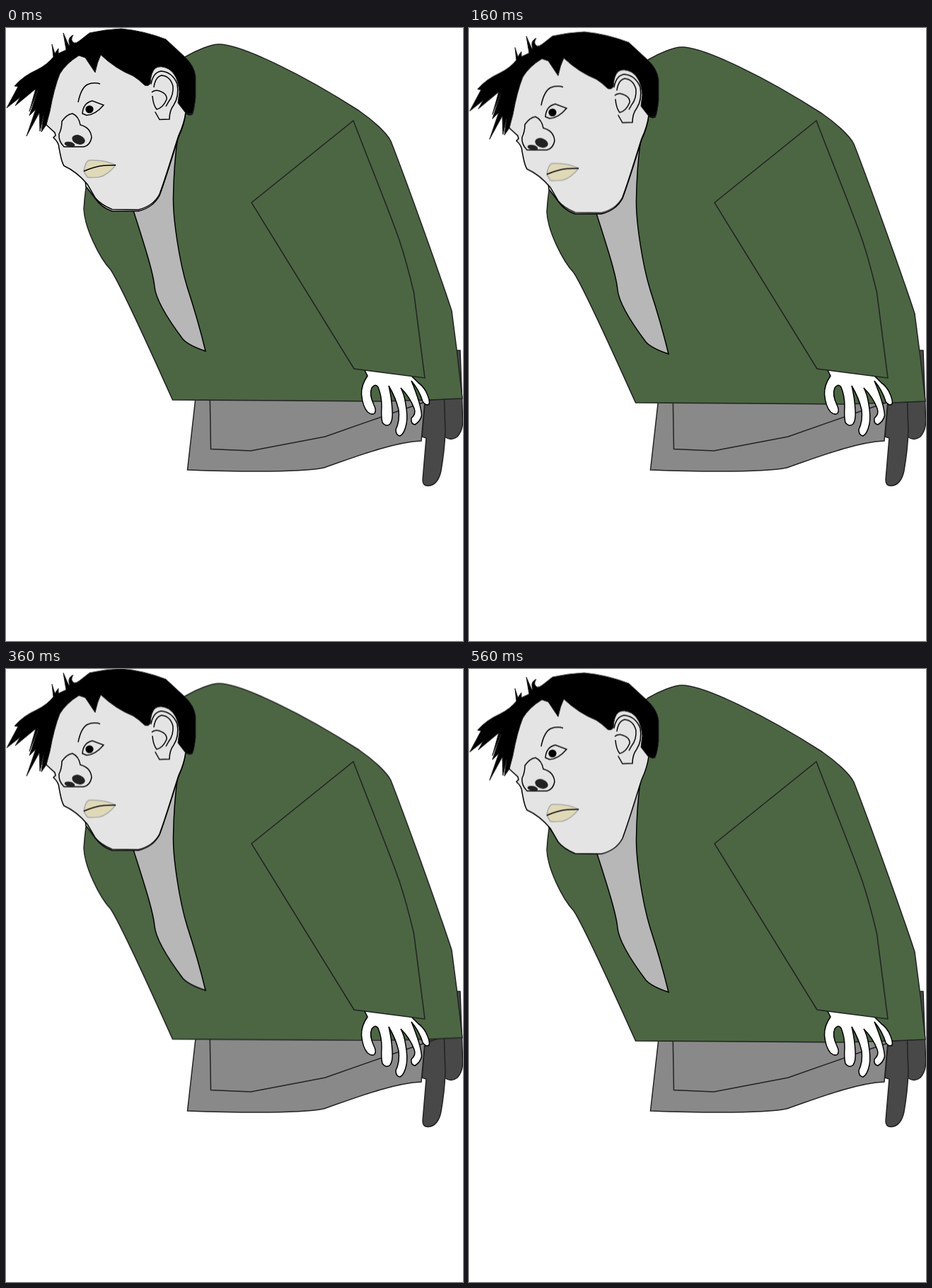
Write an HTML page that moves like this. It is 646x867 px and loops after 0.6 s.

```html
<!DOCTYPE html>
<html lang="en">
<head>
<meta charset="utf-8">
<title>Stooped man breathing</title>
<style>
html, body { margin: 0; width: 100%; height: 100%; overflow: hidden; background: #fff; }
svg { display: block; width: 646px; height: 867px; }
path { stroke: #222; stroke-width: 1.5; }
.line { fill: none; }
.cloth { fill: #4c6643; }
.pants { fill: #898989; }
.dark { fill: #484848; }
.ink path, path.ink { stroke: #000; }
.skin { fill: #e4e4e4; }
.body { animation: body 600ms infinite; }
.head { animation: head 600ms infinite; }

/* One step is 40 ms, a fifteenth of the loop. */
@keyframes body {
  0% { transform: translateY(0); animation-timing-function: steps(3); }
  20% { transform: translateY(6px); animation-timing-function: steps(2); }
  33.3333% { transform: translateY(2px); animation-timing-function: steps(2); }
  46.6667% { transform: translateY(-1px); animation-timing-function: steps(2); }
  60% { transform: translateY(-2.5px); animation-timing-function: steps(2); }
  73.3333% { transform: translateY(-1px); animation-timing-function: steps(3); }
  93.3333%, 100% { transform: translateY(0); animation-timing-function: steps(1); }
}
@keyframes head {
  0% { transform: translateY(0); animation-timing-function: steps(3); }
  20% { transform: translateY(4.5px); animation-timing-function: steps(2); }
  33.3333% { transform: translateY(4.5px); animation-timing-function: steps(2); }
  46.6667% { transform: translateY(0); animation-timing-function: steps(2); }
  60% { transform: translateY(-1.5px); animation-timing-function: steps(2); }
  73.3333% { transform: translateY(-1.5px); animation-timing-function: steps(3); }
  93.3333%, 100% { transform: translateY(4.5px); animation-timing-function: steps(1); }
}
</style>
</head>
<body>
<svg viewBox="0 0 646 867">
  <g id="legs">
    <path class="dark" d="M630 456H642L645.5 550Q647 568 638 578Q629 585 620 578L616 520Z"/>
    <path class="dark" d="M594 510L588 578L594 580L589 639Q589 648 597 647.5Q611 646 615 626Q620 597 621 570L619 510Z"/>
    <path class="pants" d="M270 505L256.5 625Q310 627 355 627Q425 627 449 622C490 608 545 586 587 584L594 505Z"/>
    <path class="line" d="M288 505L289.5 595.5L346 598L451 578L548 544L610 523"/>
  </g>

  <g class="body">
    <path class="cloth" d="M235 55L253 41C270 31 290 23 301 23C332 23 420 66 499 117C518 130 538 148 544 160C568 222 613 348 630 400L637.5 458L645 524L600 526L530 528L235.5 526C205 458 160 360 148 342C132 325 111 282 110 256Q111 240 113 226L120 200Z"/>
    <path class="ink" fill="#b7b7b7" d="M176 245L180 258C195 305 208 345 210 366C212 387 235 420 250 440Q258 449 282 457Q272 415 256 366C245 330 236 270 236.5 240Q237 195 243 152L225 170Z"/>
    <path class="ink" fill="#fff" d="M110 200L113 224L126 241Q135 254 150 259H187Q208 254 217 237C228 207 238 172 244 154Q252 137 254 120Q258 124 263 122Q266 116 267 100L220 70Z"/>
  </g>

  <path class="ink" fill="#fff" d="M505 480L511 492Q502 505 502.5 518Q504 535 511 543Q517 548 521 545Q524 541 520 533Q513 518 517 509Q522 502 526 508Q531 520 531 535Q530 550 532 558Q537 565 543 560Q547 555 546 540Q545 522 541 506Q551 523 555 540Q557 555 551 568Q551 576 557 577Q563 574 566 560Q568 548 565 532Q563 518 558 509Q571 522 577 538Q580 546 573 552Q572 560 578 561Q586 556 587.5 548Q587 533 573 499Q584 512 589 528Q593 535 598 532Q600 527 593 513Q588 505 583 502L571 490Z"/>
  <path class="cloth" d="M347 247L491 131C515 194 543 262 556 300Q566 330 576.5 374L592 495L492 482Z"/>

  <g class="head ink">
    <path class="skin" d="M57 137L69 148L70 152L67 155Q75 162 75 170L77 180Q79 190 82 195Q100 203 115 221L126 240Q134 250 150 256.5L187 257Q208 252 217 235C228 205 238 170 244 152Q252 135 254 119L245 50L130 28L100 28L68 58L52 105Z"/>
    <path style="stroke:#222;stroke-width:1" d="M1 113Q9 98 17 83L12 82Q24 68 44 59Q58 52 67 41L65 23L69 36L74 29L74 36L85 31L81 7L88 23Q91 28 89 20Q88 13 95 10Q90 17 96 21Q99 22 104 18L118 7Q140 2 163 1Q195 4 226 16L253 41Q266 53 268 68V98Q266 115 263 121Q258 123 253 119L243 106L245 90Q243 66 230 58Q218 52 211 57Q205 62 204 78Q202 83 196 81Q188 73 180 68Q155 58 134 38Q129 48 126 63L112 42L103 39Q85 50 76 65Q68 85 62 118L57 137L50 147L53 124L48 146L47 120L29 153L42 115L33 124L45 88L33 118L42 86L13 110L20 98Z"/>
    <path class="skin" stroke-linecap="round" d="M205 79Q208 63 219 61Q235 62 242 79Q245 97 237 109Q231 117 231 129L217 129.5L211 119"/>
    <path class="line" d="M209 84Q211 69 220 67Q232 68 236 82Q237 95 230 104L226 111M206 91Q212 85 223 92Q228 96 227 101Q222 113 213 115Q208 109 207 96"/>
    <path class="line" d="M102 105Q106 85 115 80Q124 76 133 79"/>
    <path class="skin" d="M108 121Q109 106 122 103L138 109Q126 123 114 123.5Z"/>
    <circle cx="118" cy="115" r="5.6"/>
    <path class="skin" d="M82 168Q74 160 75 150Q79 142 79 132Q86 122 94 121Q103 125 105 137Q120 141 121 155Q119 166 110 168Z"/>
    <g fill="#222">
      <ellipse cx="102.5" cy="158" rx="9.5" ry="6.5" transform="rotate(20 102.5 158)"/>
      <ellipse cx="90" cy="164.5" rx="7.5" ry="3.5" transform="rotate(12 90 164.5)"/>
    </g>
    <path fill="#dfd9b8" style="stroke:#aaa" d="M110 203Q112 188 118 187Q140 186 155 194Q143 209 131 211Q118 212 115 211Z"/>
    <path class="line" d="M110 202.5Q125 196 138 194.5L155 194"/>
  </g>
</svg>
</body>
</html>
```
